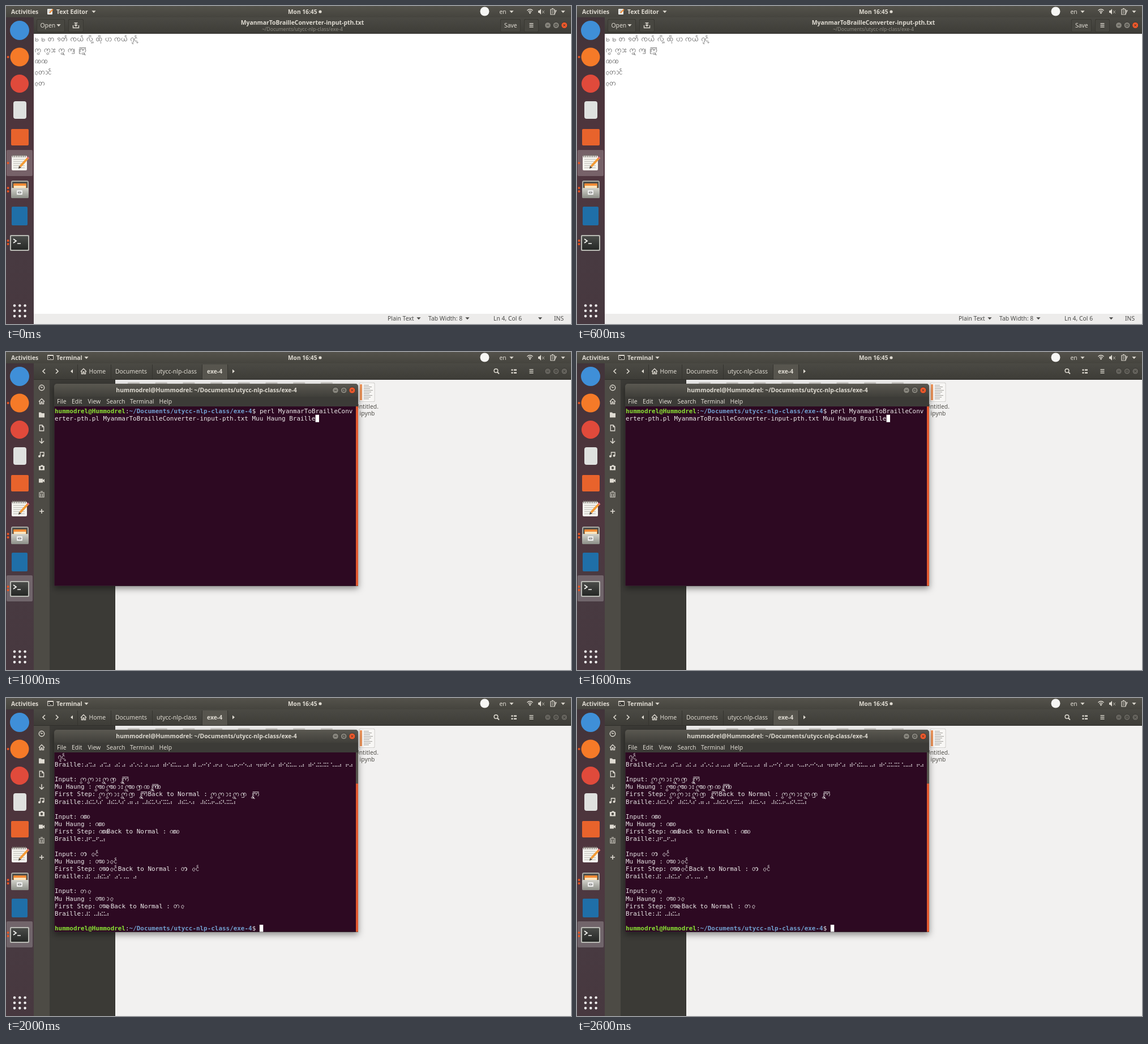
Recreate the animation shown at these times as an HTML page with a canvas. Size 998 by 561 pixels, loop 3000 ms.

```html
<!DOCTYPE html>
<html lang="en">
<head>
<meta charset="utf-8">
<title>Desktop session</title>
<style>
html, body { margin: 0; width: 100%; height: 100%; overflow: hidden; background: #3c3b37; }
canvas { display: block; }
</style>
</head>
<body>
<canvas id="stage" width="998" height="561"></canvas>
<script>
const ctx = document.getElementById('stage').getContext('2d');
const LIGHT = '#dfdbd2', ORANGE = '#e95420', CELL = 6.58, ROW = 13.15;
const USER = 'hummodrel', HOST = 'Hummodrel', DIR = '~/Documents/utycc-nlp-class/exe-4';

// ---- drawing helpers
function rect(x, y, w, h, color, radius = 0) {
  ctx.fillStyle = color;
  ctx.beginPath();
  ctx.roundRect(x, y, w, h, radius);
  ctx.fill();
}
function disc(x, y, r, color) {
  ctx.fillStyle = color;
  ctx.beginPath();
  ctx.arc(x, y, r, 0, 7);
  ctx.fill();
}
function ring(x, y, r, color, width = 1) {
  ctx.strokeStyle = color;
  ctx.lineWidth = width;
  ctx.beginPath();
  ctx.arc(x, y, r, 0, 7);
  ctx.stroke();
}
function path(d, x, y, color, width = 0, scale = 1) {
  ctx.save();
  ctx.translate(x, y);
  ctx.scale(scale, scale);
  ctx.fillStyle = ctx.strokeStyle = color;
  ctx.lineWidth = width;
  if (width) ctx.stroke(new Path2D(d)); else ctx.fill(new Path2D(d));
  ctx.restore();
}
function fade(y0, y1, ...colors) {
  const g = ctx.createLinearGradient(0, y0, 0, y1);
  colors.forEach((c, i) => g.addColorStop(i / (colors.length - 1), c));
  return g;
}
function text(s, x, y, { color = LIGHT, size = 10.4, bold = false, align = 'left', font = '"Noto Sans", sans-serif' } = {}) {
  ctx.font = `${bold ? 'bold ' : ''}${size}px ${font}`;
  ctx.textAlign = align;
  ctx.fillStyle = color;
  ctx.fillText(s, x, y);
}
const arrow = (x, y, color = LIGHT) => path('M-3.6-1.8H3.6L0 2.2Z', x, y, color);
const menuLines = (x, y) => [-3, 0, 3].forEach(d => rect(x - 3.5, y + d - .7, 7, 1.4, LIGHT));

// ---- Myanmar script: [advance, strokes]; marks have no advance and hang on the pen position
const glyphs = {
  ' ': [4.5, ''],
  m: [7, 'M.6 0V6H3.6A1.9 1.9 0 1 0 1.7 3.9'],
  k: [12, 'M4.8 3A2.3 3 0 1 0 2.5 6Q4.8 6 4.8 3Q4.8 0 7.1 0T9.6 3 8 6'],
  K: [7, 'M1.6 6Q5 6 5 3T2.6 0 .4 2 2 3.4 2.6 2.2'],
  t: [12, 'M1.8 6Q0 5.4 0 3T2.4 0 4.8 3 7.2 6 9.6 3 7.2 0 4.8 3'],
  y: [12, 'M1.6 0Q0 .6 0 3T2.4 6 4.8 3V.8M4.8 3Q4.8 6 7.2 6T9.6 3 7.8 0'],
  l: [12, 'M1.6 6Q0 5.4 0 3T2.4 0 4.8 3 7.2 6 9.6 3 7.8 0'],
  c: [12, 'M4.8 3A2.4 3 0 1 0 2.4 6Q4.8 6 4.8 3A2.4 3 0 1 1 7.2 6Q5.4 6 4.8 3'],
  p: [6.5, 'M1.4 0Q0 .8 0 3T2.6 6 5.2 3 3.8 0'],
  r: [6.5, 'M1.4 6Q0 5.4 0 3T2.4 0 4.8 3V8.6'],
  n: [6.5, 'M4.6 1.2A2.6 3 0 1 0 4.6 5'],
  s: [12, 'M1.6 6Q0 5.4 0 3T2.4 0 4.8 3V4.4M4.8 3Q4.8 0 7.2 0T9.6 3 7.8 6'],
  S: [14, 'M5 .2H1V8.6H4M3.6 6Q2.4 5 2.6 3T5 0 7.4 3V4.4M7.4 3Q7.4 0 10 0T12.4 3 10.4 6M1-2H12V0'],
  A: [11.5, 'M1.6 6Q0 5.4 0 3T2.4 0 4.8 3 2.6 5M4.8 3Q4.8 6 7.2 6T9.6 3 7.4 0 5.8 2 7 3.4'],
  e: [6.5, 'M4.2 6A2.4 3 0 1 1 4.8 3Q4.6 4.6 2.8 4.6'],
  a: [5, 'M0 .3Q3.6-.6 3.6 3T.2 6'],
  ':': [4, 'M.6 2a1 1 0 1 1 .1 0M.6 6a1 1 0 1 1 .1 0'],
  Y: [2, 'M-1.2 0V8.4H-6'],
  '~': [0, 'M-3-4Q-6-4.4-6-2.6T-3-1.4'],
  o: [0, 'M-6.6-1.4a1.8 1.4 0 1 1 .1 0'],
  u: [0, 'M-4 7.4V10.2'],
  '.': [0, 'M-1.6 9.4a1.1 1.1 0 1 1 .1 0'],
  w: [0, 'M-6.4 7.2a2 1.5 0 1 0 .1 0'],
  h: [0, 'M-4 7.2V10.6H-1.6']
};
function myanmar(s, x, y, color, cell = 0) {
  for (const ch of s) {
    const [advance, d] = glyphs[ch];
    path(d, x, y, color, .85, cell ? .95 : 1);
    x += cell && advance ? cell : advance;
  }
}

// ---- shell: top bar and dock
function topBar(app, arrowX) {
  rect(0, 0, 998, 20, fade(0, 20, '#54524b', '#45443e'));
  text('Activities', 9, 13.5, { bold: true });
  text(app, 89, 13.5, { bold: true });
  arrow(arrowX, 10);
  if (app === 'Terminal') {
    rect(73, 5, 11, 9, LIGHT, 1);
    rect(74, 7, 9, 6, '#33322e');
    path('M1 1L3 2.5L1 4M4 4.5H6', 74, 7, LIGHT, .8);
  } else {
    rect(73, 5, 9, 10, '#eeeeea', 1);
    path('M2 3H7M2 5H7M2 7H6', 73, 5, '#999', .7);
    path('M0 0L6-6', 77, 12, '#f28a2e', 2);
  }
  text('Mon 16:45', 498, 13.5, { bold: true, size: 10.2 });
  disc(555, 10, 2.6, LIGHT);
  disc(845.5, 9.5, 8, '#f6f6f4');
  text('en', 871.5, 13.5);
  arrow(893, 10);
  path('M-5-2Q0-6.5 5-2M-3 .2Q0-2.6 3 .2', 925.5, 10, LIGHT, 1.3);
  path('M-2 1.5Q0 0 2 1.5L0 4Z', 925.5, 10, LIGHT);
  path('M-5-2H-3L0-5V5L-3 2H-5Z', 945, 10, LIGHT);
  path('M2-2L6 3M6-2L2 3', 945, 10, '#aaa79e', 1);
  path('M-4-4H3V5H-4ZM-2-5.5H1M-2-1H1M-2 2H1', 966, 10, LIGHT, 1.2);
  path('M0 0L4-1L1 5', 968, 9, LIGHT, 1.1);
  arrow(984, 10);
}
function dock(activeY, dots) {
  rect(0, 20, 49, 541, fade(20, 561, '#41343a', '#4b343b', '#50363f', '#483a41', '#47383f'));
  rect(1, activeY - 23, 46, 46, 'rgba(255,255,255,.22)', 2);
  dots.forEach(y => disc(3.6, y, 2, ORANGE));
  disc(24, 43, 17, '#3f8fd8');
  disc(24, 90, 16.5, '#f57a28');
  disc(24, 137, 16, '#e04a3b');
  rect(13, 168, 23, 31, '#dfe1df', 4);
  rect(9, 217, 31, 29, '#e8632c', 2);
  // notepad
  rect(10, 264, 27, 26, '#f4f3ee', 2);
  for (let i = 0; i < 8; i++) rect(11.5 + i * 3.1, 262, 1.4, 5, '#77736c');
  for (let i = 0; i < 5; i++) rect(13, 270 + i * 3.7, 20, 1, '#bbb9b3');
  path('M0 0L13-14', 25, 283, '#f39a35', 4);
  path('M13-14L15-16', 25, 283, '#e57579', 4);
  path('M-3 4L-2-1L2 2Z', 25, 283, '#514438');
  // file drawer
  rect(9, 308, 31, 31, '#a9aaa4', 3);
  rect(11, 310, 27, 11, '#4e4d48', 1);
  rect(13, 313, 23, 8, '#f18a35', 1);
  rect(14, 317, 21, 5, '#fae4bd');
  rect(9, 321, 31, 18, fade(321, 339, '#d2d2cb', '#8c8e87'), 2);
  rect(19, 325, 10, 8, '#eee', 1);
  path('M0 0H5V2H0Z', 21.5, 328, '#777', 1);
  rect(10, 354, 28, 33, '#1f6fa8', 2);
  // terminal
  rect(7, 404, 34, 28, '#b9bab4', 2);
  rect(9, 406, 30, 24, fade(406, 430, '#4a4c49', '#252725'), 1);
  path('M13 411L18 414.5L13 418M20 419H26', 0, 0, '#f5f5f2', 1.7);
  for (let i = 0; i < 9; i++) disc(15 + i % 3 * 9.3, 528.5 + Math.floor(i / 3) * 9.3, 2.3, '#f0eeee');
}
function windowButtons(x, y, step, active, r = 5.5) {
  [0, 1, 2].forEach(i => {
    const lit = active && i === 2, cx = x + i * step;
    disc(cx, y, r, lit ? '#f0592b' : active ? '#85837b' : '#65635d');
    ring(cx, y, r, '#33322e', .8);
    path(['M-2 0H2', 'M-1.8-1.8H1.8V1.8H-1.8Z', 'M-1.8-1.8L1.8 1.8M1.8-1.8L-1.8 1.8'][i], cx, y, '#393833', 1);
  });
}
function header() {
  rect(49, 20, 949, 29, fade(20, 49, '#4b4a44', '#3d3c37'));
  rect(49, 48, 949, 1, '#302f2b');
}
function button(x, w, color = '#484741') {
  rect(x, 23, w, 23, '#36352f', 3);
  rect(x + .8, 23.8, w - 1.6, 21.4, color, 2.5);
}

// ---- text editor
function editor() {
  rect(49, 49, 949, 494, '#fff');
  header();
  button(54, 50);
  text('Open', 60.5, 38);
  arrow(93, 34);
  button(110, 27);
  path('M-3-4H3M0-4V1M-2.5-1L0 1.5L2.5-1M-5 0V4.5H5V0', 123.5, 34, LIGHT, 1.4);
  text('MyanmarToBrailleConverter-input-pth.txt', 523.5, 33, { bold: true, align: 'center' });
  text(DIR, 523.5, 44, { size: 8.7, color: '#8d8b83', align: 'center' });
  button(873, 36);
  text('Save', 880, 38);
  button(915, 26);
  menuLines(928, 34);
  windowButtons(957, 34, 14.6, true);

  ['m m k Kk~ ty~ lou. cou pa ty~ rhn.~', 'sw swa: swh sY Swh', 'AA', 'ekan~', 'ek']
    .forEach((s, i) => myanmar(s, 51.5, 56 + i * 19.5, '#666'));

  rect(49, 543, 949, 18, '#edeceb');
  const ink = '#4a4a48';
  [['Plain Text', 674], ['Tab Width: 8', 746], ['Ln 4, Col 6', 861], ['INS', 968]]
    .forEach(([s, x]) => text(s, x, 555.3, { color: ink }));
  [729, 815, 943.5].forEach(x => arrow(x, 551, ink));
}

// ---- file manager
function files() {
  rect(192, 49, 806, 512, '#f2f1f0');
  rect(49, 49, 28, 512, '#4d4b45');
  rect(77, 49, 116, 512, '#3b3a36');
  rect(192, 49, 1, 512, '#2f2e2a');
  header();
  path('M2-4L-2 0L2 4', 67, 34, LIGHT, 1.6);
  path('M-2-4L2 0L-2 4', 90, 34, LIGHT, 1.6);
  rect(347, 22, 44, 26, '#57554e');
  [126, 185, 258, 346, 391].forEach(x => rect(x, 22, 1, 26, '#35342f'));
  path('M2-3.5V3.5L-2 0Z', 116, 34, LIGHT);
  path('M-2-3.5V3.5L2 0Z', 402, 34, LIGHT);
  const house = 'M-5 .5L0-4.5L5 .5M-3.5 0V4.5H-1V1H1V4.5H3.5V0';
  path(house, 137, 34, LIGHT, 1.3);
  text('Home', 146.5, 38);
  text('Documents', 193, 38);
  text('utycc-nlp-class', 266, 38);
  text('exe-4', 355, 38, { bold: true });
  ring(865.5, 33, 3.3, LIGHT, 1.5);
  path('M0 0L3 3', 868, 35.5, LIGHT, 1.8);
  [-2.5, 2.5].forEach(d => {
    rect(892.5, 33 + d, 3, 2.4, LIGHT);
    rect(897, 33 + d, 5, 2.4, LIGHT);
  });
  menuLines(928, 34);
  windowButtons(957, 34, 14.6, false);

  const outline = (d, y, w = 1.3) => path(d, 63, y, LIGHT, w);
  const solid = (d, y) => path(d, 63, y, LIGHT);
  ring(63, 63, 4.7, LIGHT, 1.4);
  outline('M-2-2L0 0L2-1', 63);
  outline(house, 87);
  solid('M-5-4.5H-1L0-3H5V4.5H-5Z', 111);
  outline('M-3.7-5H1L3.7-2V5H-3.7ZM1-5V-2H4', 134);
  outline('M0-5V3M-4 0L0 4L4 0', 157, 1.5);
  outline('M-2.5 3V-4H4V2', 181);
  disc(59, 184, 2, LIGHT);
  disc(65.5, 183, 2, LIGHT);
  solid('M-5-3H-2L-1-4.5H2L3-3H5V4.5H-5Z', 204);
  disc(63, 204.5, 2.2, '#4d4b45');
  solid('M-5-3.5H2V-1L5-3V3L2 1V3.5H-5Z', 227);
  outline('M-5-3H5M-2-5H2M-4-2V5H4V-2M-1.5-1V4M1.5-1V4', 251, 1.1);
  outline('M-4 0H4M0-4V4', 281, 1.6);

  for (let i = 0; i < 8; i++) rect(215 + i * 48.7, 53.5, 21, 5, '#cbc9c5', 1);
  rect(623.5, 54, 28, 34, '#c9c7c3', 2);
  rect(624.3, 54.8, 26.4, 32.4, '#f8f7f5', 2);
  rect(625, 57, 4, 28, '#f0965b');
  for (let i = 0; i < 9; i++) rect(632, 58 + i * 3, 9 + i * 5 % 8, 1.2, '#aaa8a4');
  const label = { color: '#55534e', align: 'center' };
  text('Untitled.', 637, 100, label);
  text('ipynb', 638, 112, label);
}

// ---- terminal window
const mono = { font: '"DejaVu Sans Mono", monospace', size: 10.93, color: '#eceaea' };
const rowY = row => 107.7 + row * ROW;
const colX = col => 86 + col * CELL;
const print = (s, col, row, style) => text(s, colX(col), rowY(row), { ...mono, ...style });
const script = (s, col, row) => myanmar(s, colX(col), rowY(row) - 6, mono.color, CELL);
const caret = (col, row) => rect(colX(col), rowY(row) - 10.2, 6.4, 13, '#fff');

function prompt(row) {
  const login = `${USER}@${HOST}`;
  print(login, 0, row, { bold: true, color: '#8ae234' });
  print(':', login.length, row);
  print(DIR, login.length + 1, row, { bold: true, color: '#729fcf' });
  print('$', login.length + 1 + DIR.length, row);
}
function braille(s, row) {
  print('Braille:', 0, row);
  [...s].forEach((ch, i) => {
    const bits = ch === ' ' ? 0 : ch.codePointAt(0) - 0x2800;
    for (let b = 0; b < 6; b++) {
      if (bits >> b & 1)
        rect(colX(8 + i) + 1.2 + (b > 2) * 3, rowY(row) - 6.6 + b % 3 * 2.6, 1.6, 1.6, mono.color);
    }
  });
}
function conversion(row, input, long, step, stepCells, dots) {
  print('Input:', 0, row);
  script(input, 7, row);
  print('Mu Haung :', 0, row + 1);
  script(long, 11, row + 1);
  print('First Step:', 0, row + 2);
  script(step, 12, row + 2);
  print('Back to Normal :', 12 + stepCells, row + 2);
  script(input, 29 + stepCells, row + 2);
  braille(dots, row + 3);
}
function command() {
  prompt(0);
  print('perl MyanmarToBrailleConv', 55, 0);
  print('erter-pth.pl MyanmarToBrailleConverter-input-pth.txt Muu Haung Braille', 0, 1);
  caret(70, 1);
}
function output() {
  script('rhn.~', 1, 0);
  braille('⠴⠩⠴ ⠴⠩⠴ ⠴⠅⠴ ⠴⠡⠢⠅⠴⠠⠤⠴ ⠾⠊⠮⠥⠤⠠⠴ ⠾⠠⠔⠊⠎⠠⠖⠴ ⠢⠤⠖⠔⠊⠢⠴ ⠲⠖⠾⠊⠴ ⠾⠊⠮⠥⠤⠠⠴ ⠾⠊⠬⠥⠭⠅⠡⠤⠴ ⠖⠴', 1);
  conversion(3, 'sw sw a:swh sY Swh', 'swA swA a:swhA sYA SwhA', 'sw sw a:swh sY Swh', 13,
    '⠼⠮⠥⠣⠎ ⠼⠮⠥⠣⠎⠠⠶⠠⠆⠠⠼⠮⠥⠣⠎⠭⠥⠆ ⠼⠮⠥⠢⠆ ⠼⠮⠥⠖⠤⠮⠣⠭⠥⠆');
  conversion(8, 'AA', 'AA', 'AA', 2, '⠼⠋⠤⠋⠤⠆');
  conversion(13, 'ka en~', 'kA aen~', 'kAaen~', 5, '⠼⠅⠠⠼⠮⠥⠎ ⠴⠡⠠⠤ ⠴');
  conversion(18, 'k e', 'kA ae', 'kAe', 3, '⠼⠅⠠⠼⠮⠥⠆');
  prompt(23);
  caret(55, 23);
}
function terminal(content, thumbY) {
  ctx.save();
  ctx.shadowColor = 'rgba(0,0,0,.45)';
  ctx.shadowBlur = 12;
  ctx.shadowOffsetY = 4;
  rect(85, 56, 537, 357, '#3c3b37', [5, 5, 0, 0]);
  ctx.restore();
  rect(85, 56, 537, 23, fade(56, 79, '#5a5851', '#403f3a'), [5, 5, 0, 0]);
  text(`${USER}@${HOST}: ${DIR}`, 354, 71, { bold: true, align: 'center' });
  windowButtons(582, 67.5, 14.7, true);
  [['File', 90], ['Edit', 116], ['View', 144.5], ['Search', 177.5], ['Terminal', 219], ['Help', 270.5]]
    .forEach(([s, x]) => text(s, x, 91.3));
  rect(85.5, 96, 533, 316.5, '#2d0922');
  rect(618, 96, 4, 316.5, '#55534c');
  rect(618, thumbY, 4, 412.5 - thumbY, '#e3592f');
  ctx.save();
  ctx.beginPath();
  ctx.rect(85.5, 96, 533, 316.5);
  ctx.clip();
  content();
  ctx.restore();
}

// ---- one second per scene
const desktop = (content, thumbY) => () => {
  topBar('Terminal', 142);
  files();
  dock(417, [90, 321, 327, 414, 420]);
  terminal(content, thumbY);
};
const scenes = [
  () => {
    topBar('Text Editor', 155);
    editor();
    dock(277, [90, 277, 321, 327, 414, 420]);
  },
  desktop(command, 96),
  desktop(output, 151)
];
const start = performance.now();
function frame() {
  const t = (performance.now() - start) % 3000;
  scenes[Math.floor(t / 1000)]();
  requestAnimationFrame(frame);
}
frame();
</script>
</body>
</html>
```
